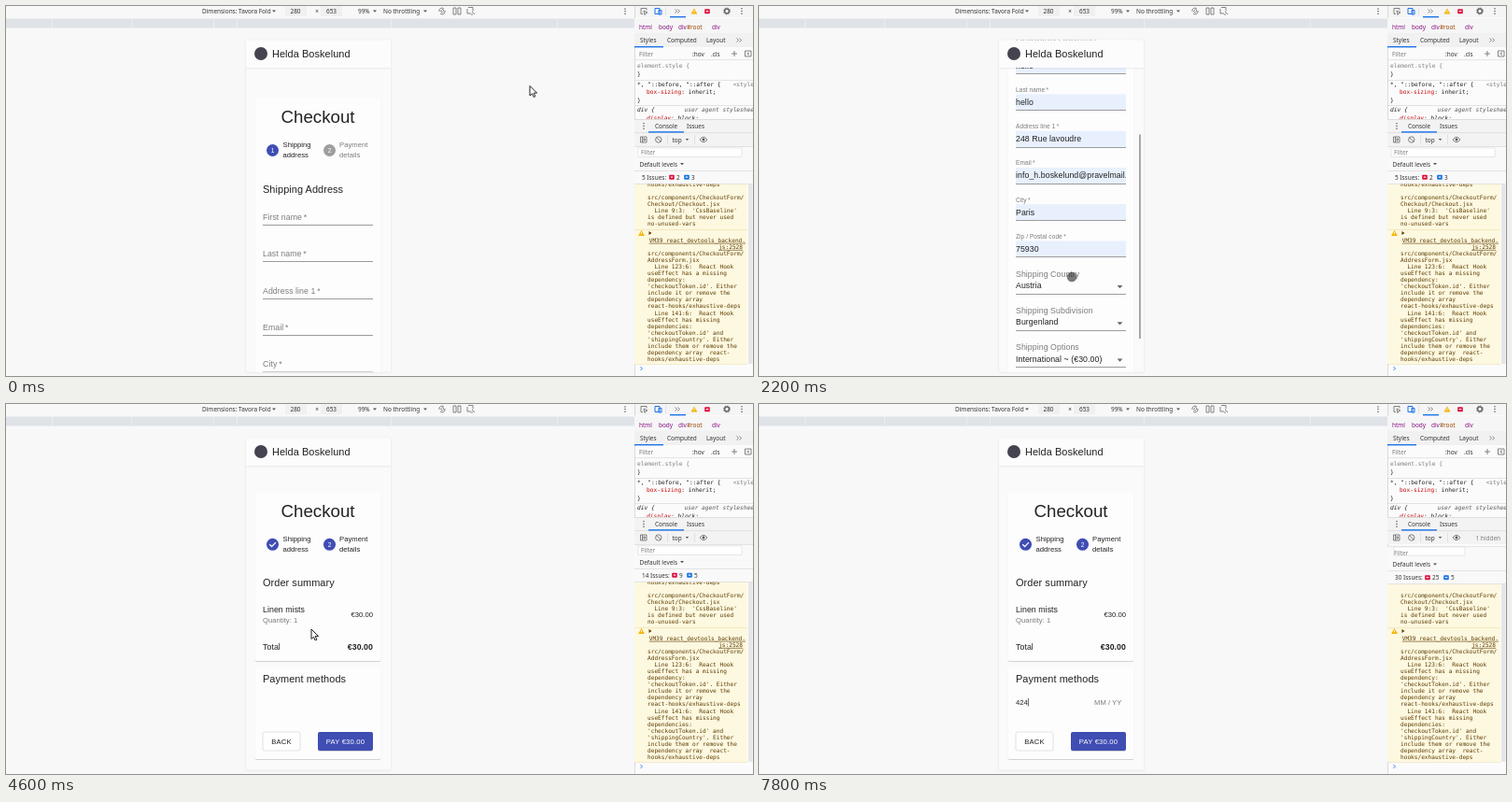
Animation of 800x396 px, one loop 8 s. Source, as an HTML page:

```html
<!DOCTYPE html>
<html lang="en">
<head>
<meta charset="utf-8">
<title>Checkout walkthrough</title>
<style>
html, body { margin: 0; width: 100%; height: 100%; overflow: hidden; background: #f8f8f9; }
svg { display: block; width: 100%; height: 100%; }
text { white-space: pre; fill: #222; }
.ui { font: 6.45px "Noto Sans", sans-serif; fill: #333; }
.pop { font: 8.5px "Noto Sans", sans-serif; }
.code { font: 6.2px "DejaVu Sans Mono", monospace; }
.log { font: 6.13px "DejaVu Sans Mono", monospace; fill: #5c3c00; }
.h4, .h6, .body, .small, .tiny, .btn { font-family: "Liberation Sans", Arial, sans-serif; }
.h4 { font-size: 18.7px; }
.h6 { font-size: 10.95px; letter-spacing: .06px; }
.body { font-size: 8.75px; letter-spacing: .07px; }
.small { font-size: 7.65px; letter-spacing: .03px; }
.tiny { font-size: 6.55px; letter-spacing: .06px; }
.btn { font-size: 7.65px; letter-spacing: .2px; }
.bold { font-weight: bold; }
.it { font-style: italic; }
.tag { fill: #881280; }
.grey { fill: #7c7c7c; }
.white { fill: #fff; }
.blue { fill: #3f4db3; }
.end { text-anchor: end; }
.mid { text-anchor: middle; }
.line { fill: none; stroke: #666; stroke-width: .8; }
.filled, .focused, .pay, .card, .late { display: none; }
.is-filled .filled, .is-focused .focused, .is-pay .pay, .is-card .card, .is-late .late { display: inline; }
.is-filled .empty, .is-focused .unfocused, .is-pay .ship, .is-late .early { display: none; }
</style>
</head>
<body>
<svg id="stage" viewBox="0 0 800 396" preserveAspectRatio="none"></svg>
<script>
const stage = document.getElementById('stage');
const esc = s => s.replace(/&/g, '&amp;').replace(/</g, '&lt;');
const text = (x, y, s, cls, extra = '') => `<text x="${x}" y="${y}" class="${cls}" ${extra}>${esc(s)}</text>`;
const rect = (x, y, w, h, fill, extra = '') => `<rect x="${x}" y="${y}" width="${w}" height="${h}" fill="${fill}" ${extra}/>`;
const disc = (x, y, r, fill) => `<circle cx="${x}" cy="${y}" r="${r}" fill="${fill}"/>`;
const path = (d, extra = 'class="line"') => `<path d="${d}" ${extra}/>`;
const group = (cls, inner, extra = '') => `<g class="${cls}" ${extra}>${inner}</g>`;
const down = (x, y, r = 2, fill = '#555') => path(`M${x - r} ${y - r / 2}h${2 * r}l${-r} ${r * 1.1}z`, `fill="${fill}"`);
const more = (x, y) => path(`M${x - 2.5} ${y - 2}l2 2-2 2m3-4l2 2-2 2`);
const dots = (x, y) => [-2.7, 0, 2.7].map(d => disc(x, y + d, .75, '#555')).join('');
const gear = (x, y) => `<circle cx="${x}" cy="${y}" r="2.4" class="line" style="stroke-width:1.5"/>` +
  `<circle cx="${x}" cy="${y}" r="3.6" class="line" stroke-dasharray="1.4 1.43"/>`;
const warning = (x, y) => path(`M${x} ${y - 3}l3.4 6h-6.8z`, 'fill="#f4b400"') + rect(x - .4, y - 1, .8, 2.4, '#fff');
const badge = (x, y, fill) => rect(x - 2.8, y - 2.8, 5.6, 5, fill, 'rx=".8"') + rect(x - 1.2, y - 1, 2.4, 1.2, '#fff');

const EMAIL = 'info_h.boskelund@pravelmail.com';
const BLUE = '#3f4db3', RULE = '#d4d4d6';
const LEFT = 275, RIGHT = 393;

function toolbar() {
  return rect(0, 0, 673, 12, '#f8f8f8') + rect(0, 13.5, 673, 10, '#dfe3e8') +
    [49, 134, 222, 247, 412, 590].map(x => rect(x, 14, .8, 9, '#eef0f3')).join('') +
    text(210, 8.2, 'Dimensions: Tavora Fold', 'ui') + down(287, 5.6) +
    rect(299, .5, 23, 10.5, '#f0f0f1') + text(310, 8.2, '280', 'ui mid') +
    text(333, 8.2, '×', 'ui mid') +
    rect(337, .5, 23, 10.5, '#f0f0f1') + text(348.5, 8.2, '653', 'ui mid') +
    text(377, 8.2, '99%', 'ui') + down(395, 5.6) +
    text(404, 8.2, 'No throttling', 'ui') + down(449, 5.6) +
    path('M464 6a3 3 0 0 1 5-3M470 5a3 3 0 0 1-5 3M465.5 5.5l2-2 1.7 1.7-2 2z') +
    path('M479 2h3v7h-3zM484 2h3v7h-3z') + path('M495 1.5h5v4M494 3v5h4M499 6l3 3M498 9l2 0') + dots(663, 5.6);
}

function stylesPane() {
  return rect(673, 0, 127, 396, '#fbfbfc') + rect(673, 0, 127, 12, '#f5f5f6') + rect(673, 0, .8, 396, RULE) +
    path('M682 8.5h-2v-6h6v2M683 5l4 2-2 .5-1 2z') +
    path('M695 2.5h5v6h-5zM699 4.5h3v4.5h-3z', 'fill="none" stroke="#1a73e8"') +
    more(719, 5.5) + rect(711, 11, 17, 1.4, '#1a73e8') + rect(706, 1, .6, 9, RULE) +
    warning(737, 5.5) + badge(751, 6, '#e0113c') + gear(772, 5.5) + dots(788, 5.5) +
    rect(673, 13, 127, 16, '#f6f6f7') + text(678, 24.5, 'html', 'ui tag') + text(699, 24.5, 'body', 'ui tag') +
    `<text x="720" y="24.5" class="ui tag">div<tspan fill="#994500">#root</tspan></text>` + text(756, 24.5, 'div', 'ui tag') +
    rect(673, 29, 127, 15, '#f1f1f2') + text(679, 39, 'Styles', 'ui') + text(708, 39, 'Computed', 'ui') +
    text(750, 39, 'Layout', 'ui') + more(785, 36.5) + rect(673, 43, 31, 1.4, '#1a73e8') +
    text(678, 54, 'Filter', 'ui grey') + text(735, 53.5, ':hov', 'ui') + text(755, 53.5, '.cls', 'ui') +
    path('M777 51h6M780 48v6') + path('M791.5 48h6.5v6h-6.5zM796 49.5l-2 1.5 2 1.5') +
    rect(673, 57.5, 127, .6, RULE) +
    text(676, 65.8, 'element.style {', 'code grey') + text(676, 74.8, '}', 'code') + rect(673, 79, 127, .6, RULE) +
    text(676, 85.8, '*, "::before, "::after {', 'code') + text(801, 85.8, '<style', 'code end grey') +
    `<text x="686" y="94.3" class="code"><tspan fill="#c80000">box-sizing</tspan>: inherit;</text>` +
    text(676, 102.8, '}', 'code') + rect(673, 106, 127, .6, RULE) +
    text(676, 113, 'div {', 'code it') + text(801, 113, 'user agent styleshee', 'code it end', 'fill-opacity=".75"') +
    `<text x="686" y="122" class="code it"><tspan fill="#c80000">display</tspan>: block;</text>`;
}

const LOG_HEAD = `src/components/CheckoutForm/
Checkout/Checkout.jsx
  Line 9:3:  'CssBaseline'
is defined but never used
no-unused-vars`;
const LOG_TAIL = `src/components/CheckoutForm/
AddressForm.jsx
  Line 123:6:  React Hook
useEffect has a missing
dependency:
'checkoutToken.id'. Either
include it or remove the
dependency array
react-hooks/exhaustive-deps
  Line 141:6:  React Hook
useEffect has missing
dependencies:
'checkoutToken.id' and
'shippingCountry'. Either
include them or remove the
dependency array  react-
hooks/exhaustive-deps`;

function consolePane() {
  const lines = (s, y) => s.split('\n').map((l, i) => text(687, y + i * 7.06, l, 'log')).join('');
  const box = `stroke="${RULE}" stroke-width=".5"`;
  const filters = rect(673, 150, 127, 40, '#f9f9fa') + rect(673, 150, 127, .6, RULE) +
    group('early', rect(677, 152, 111, 9.5, '#fff', box)) + group('late', rect(680, 150.5, 76, 9, '#fff', box)) +
    text(680, 159, 'Filter', 'ui grey') +
    text(678.5, 171.5, 'Default levels', 'ui') + down(724, 169) +
    rect(673, 176, 127, .6, RULE) + `<text id="issues" x="681" y="185.7" class="ui"></text>` +
    group('', badge(713, 183.5, '#e0113c') + `<text id="errors" x="718" y="185.7" class="ui"></text>` +
      `<g id="infos">${badge(729, 183.5, '#1a73e8')}<text id="infoCount" x="734" y="185.7" class="ui"></text></g>`, 'id="badges"') +
    rect(673, 190, 127, .6, RULE);
  return rect(673, 190, 121, 193, '#fdf8e0') + rect(673, 239.3, 121, .7, '#efe2b0') + rect(673, 383, 121, .6, '#efe2b0') +
    rect(795, 191, 4.5, 192, '#e6e6e8') +
    group('early', lines('hooks/exhaustive-deps', 193)) + lines(LOG_HEAD, 207.1) +
    warning(680.5, 243) + path('M688.5 241l3 2-3 2z', 'fill="#5c3c00"') +
    text(792, 252.8, 'VM39 react_devtools_backend.', 'log end', 'text-decoration="underline"') +
    text(789, 259.9, 'js:2528', 'log end', 'text-decoration="underline"') + lines(LOG_TAIL, 267) +
    path('M679.5 386l2 2-2 2', 'fill="none" stroke="#3b78e7" stroke-width=".9"') +
    rect(673, 121, 127, 29, '#f3f3f4') + rect(673, 121, 127, .7, RULE) + rect(673, 135.5, 127, .6, RULE) +
    dots(683, 128.5) + text(695, 131, 'Console', 'ui') + text(729, 131, 'Issues', 'ui') + rect(688, 134.2, 38, 1.4, '#1a73e8') +
    path('M679.5 140h6.5v6h-6.5zM681.5 140v6M683 141.5l2 1.5-2 1.5z') +
    path('M702 143a3.2 3.2 0 1 1-6.4 0a3.2 3.2 0 1 1 6.4 0M696.6 140.7l4.5 4.5') +
    rect(708, 138, .6, 10, RULE) + text(713.5, 145.5, 'top', 'ui') + down(729.5, 143, 1.8) + rect(737, 138, .6, 10, RULE) +
    path('M743 143q4-5.5 8 0q-4 5.5-8 0z') + disc(747, 143, 1.4, '#555') +
    group('late', text(767.5, 145.5, '1 hidden', 'ui grey')) +
    `<g id="filters">${filters}</g>`;
}

const button = (x, y, w, label, primary) =>
  rect(x, y, w, 20, primary ? BLUE : '#fefefe', primary ? 'rx="2" filter="url(#edge)"' : 'rx="2" stroke="#d2d2d4" stroke-width=".6"') +
  text(x + w / 2, y + 12.8, label, 'btn mid' + (primary ? ' white' : ''));

const paper = (y, h) => rect(266.5, y, 135, h, '#fdfdfe', 'rx="2" filter="url(#edge)"');

// Heading and stepper, slightly higher on the payment page.
function heading(paying) {
  const y = paying ? 150.3 : 154.5;
  return text(334, y - 29.7, 'Checkout', 'h4 mid') + disc(285.5, y, 6.5, BLUE) + disc(346.5, y, 6.5, paying ? BLUE : '#9e9e9e') +
    (paying ? path(`M282.3 ${y}l2.3 2.3 4.3-4.5`, 'fill="none" stroke="#fff" stroke-width="1.3"')
      : text(285.5, y + 2.3, '1', 'tiny mid white')) +
    text(346.5, y + 2.3, '2', 'tiny mid white') +
    text(296.5, y - 3.2, 'Shipping', 'small') + text(296.5, y + 7.8, 'address', 'small') +
    ['Payment', 'details'].map((s, i) => text(357, y - 3.2 + 11 * i, s, 'small' + (paying ? '' : ' grey'))).join('');
}

const FIELDS = [['First name', 'hello'], ['Last name', 'hello'], ['Address line 1', '248 Rue lavoudre'],
  ['Email', EMAIL], ['City', 'Paris'], ['Zip / Postal code', '75930']];
const SELECTS = [['Shipping Country', 'Austria'], ['Shipping Subdivision', 'Burgenland'], ['Shipping Options', 'International ~ (€30.00)']];
const fieldLine = i => 234.5 + 39.25 * i;
const underline = y => rect(LEFT, Math.floor(y), 118, 1, '#9c9c9e');

function shippingPage() {
  const fields = FIELDS.map(([label, value], i) => {
    const y = fieldLine(i), star = label + '\u2009*';
    return group('empty' + (i ? '' : ' unfocused'), text(LEFT, y - 5.4, star, 'body grey')) +
      group('filled', rect(LEFT, y - 17.3, 118, 17, '#e8f0fe') + text(LEFT, y - 20, star, 'tiny grey') +
        text(LEFT, y - 6, value, 'body', 'clip-path="url(#inputClip)"')) + underline(y);
  }).join('');
  const selects = SELECTS.map(([label, value], i) => {
    const y = fieldLine(i + 6);
    return text(LEFT, y - 18.5, label, 'body grey') + text(LEFT, y - 6, value, 'body') +
      down(386.5, y - 7.5, 2.9, '#666') + underline(y);
  }).join('');
  const y = fieldLine(0);
  return paper(98.5, 490.5) + heading(false) + text(LEFT, 199.7, 'Shipping Address', 'h6') + fields + selects +
    group('focused', text(LEFT, y - 19.2, 'First name\u2009*', 'tiny blue') + rect(LEFT, y - .7, 118, 1.3, BLUE) +
      rect(LEFT, y - 14.5, .6, 10, '#aaa')) +
    button(LEFT, 560.5, 76, 'BACK TO CART') + button(354, 560.5, 39, 'NEXT', true);
}

function paymentPage() {
  return paper(94.5, 180.5) + paper(282, 98) + heading(true) +
    text(LEFT, 195.3, 'Order summary', 'h6') + text(LEFT, 222.7, 'Linen mists', 'body') +
    text(LEFT, 234.3, 'Quantity: 1', 'small grey') + text(RIGHT, 228, '€30.00', 'small end') +
    text(LEFT, 263, 'Total', 'body') + text(RIGHT, 263, '€30.00', 'body bold end') +
    text(LEFT, 298.4, 'Payment methods', 'h6') +
    group('card', `<text id="cardNumber" x="${LEFT}" y="321.5" class="small"></text>` + text(359, 321.5, 'MM / YY', 'small grey') +
      rect(LEFT, 315, .7, 8.5, '#222', 'id="caret"')) +
    button(LEFT, 351, 40, 'BACK') + button(334, 351, 59, 'PAY €30.00', true);
}

function phone() {
  const popup = rect(257, 120.5, 138, 63.5, '#fefefe', 'filter="url(#lift)"') +
    text(264, 136.7, 'hello', 'pop bold') + text(264, 150, EMAIL, 'pop', 'clip-path="url(#popClip)"') +
    rect(257, 161, 138, .6, '#f0f0f0') + text(264, 176, 'Manage addresses…', 'pop');
  return rect(257, 36.5, 155, 355, '#fafafb', 'filter="url(#soft)"') +
    `<g clip-path="url(#screen)"><g id="page" class="ship">${shippingPage()}</g>${group('pay', paymentPage())}` +
    rect(257, 36.5, 155, 29.5, '#fcfcfd', 'filter="url(#soft)"') + disc(273, 51, 7, '#45434f') +
    text(285, 54.8, 'Helda Boskelund', 'h6') + rect(407.2, 36, 1.5, 219, '#8d8d8d', 'id="thumb" rx=".7"') + '</g>' +
    group('focused', popup);
}

const clip = (id, x, y, w, h) => `<clipPath id="${id}">${rect(x, y, w, h, '#000')}</clipPath>`;
const shadow = (id, dy, blur, opacity) => `<filter id="${id}" x="-10%" y="-10%" width="120%" height="125%">` +
  `<feDropShadow dx="0" dy="${dy}" stdDeviation="${blur}" flood-opacity="${opacity}"/></filter>`;
stage.innerHTML = '<defs>' + shadow('lift', .7, 1, .22) + shadow('edge', .8, .4, .2) + shadow('soft', .5, 1, .1) +
  clip('screen', 257, 36.5, 155, 355) + clip('inputClip', LEFT, 0, 118, 700) + clip('popClip', 264, 0, 124, 396) + '</defs>' +
  toolbar() + phone() + stylesPane() + consolePane() +
  path('M0 0v10.5l2.5-2.2 1.7 3.7 1.7-.8-1.7-3.6h3.4z', 'id="arrow" fill="#fff" stroke="#222" stroke-width="1"') +
  '<circle id="touch" r="5.2" fill="#333" fill-opacity=".65"/>';

// Keys are [time, value, ...]; values ease between neighbours.
function sample(keys, t) {
  const i = keys.findIndex(k => k[0] > t);
  if (i < 0) return keys[keys.length - 1].slice(1);
  const a = keys[i - 1], b = keys[i], p = (t - a[0]) / (b[0] - a[0]), e = p * p * (3 - 2 * p);
  return a.slice(1).map((v, n) => v + (b[n + 1] - v) * e);
}
const latest = (steps, t) => steps.filter(s => s[0] <= t).pop().slice(1);

const SCROLL = [[0, 0], [600, 0], [1200, 116], [2000, 116], [2400, 208], [2800, 208], [3200, 209]];
const POINTER = [[0, 561, 85.5], [200, 561, 85.5], [600, 340, 260], [1000, 335, 200], [1400, 317, 112], [1600, 317, 124],
  [1800, 300, 137], [2000, 300, 140], [2200, 335, 290], [2600, 339.5, 278.5], [3000, 345, 300], [3600, 371, 363],
  [4000, 371, 363], [4600, 327, 241], [5200, 327, 241], [5800, 295, 318]];
const ISSUES = [[0, 5, 2, 3], [4200, 14, 9, 5], [5400, 29, 24, 5], [7000, 30, 25, 5]];
const TYPED = [[0, ''], [7200, '4'], [7400, '42'], [7600, '424']];
const STATES = { focused: [1400, 2000], filled: [2000, 8000], pay: [4200, 8000], card: [5600, 8000], late: [5400, 8000] };
const within = (t, [a, b]) => t >= a && t < b;
const el = id => document.getElementById(id);
const move = (id, x, y) => el(id).setAttribute('transform', `translate(${x} ${y})`);
const show = (id, on) => el(id).style.display = on ? 'inline' : 'none';

function render(t) {
  for (const name in STATES) stage.classList.toggle('is-' + name, within(t, STATES[name]));

  const [scroll] = sample(SCROLL, t);
  move('page', 0, -scroll);
  move('thumb', 0, scroll * 130 / 208);
  show('thumb', within(t, [800, 1400]) || within(t, [2200, 2800]));

  const [x, y] = sample(POINTER, t);
  const touching = within(t, [600, 1400]) || within(t, [2000, 4400]);
  move('arrow', x, y);
  move('touch', x, y);
  show('touch', touching);
  show('arrow', !touching && t < 6400);

  const [issues, errors, infos] = latest(ISSUES, t);
  el('issues').textContent = issues + ' Issues:';
  el('errors').textContent = errors;
  el('infoCount').textContent = infos;
  move('badges', issues > 9 ? 3 : 0, 0);
  move('infos', errors > 9 ? 4 : 0, 0);
  move('filters', 0, within(t, STATES.late) ? 2.5 : 0);

  const [typed] = latest(TYPED, t);
  el('cardNumber').textContent = typed || 'Card number';
  el('cardNumber').setAttribute('class', typed ? 'small' : 'small grey');
  move('caret', typed.length * 4.3, 0);
  show('caret', t >= 6200);
}

let shown = -1;
function tick(now) {
  const t = Math.floor(now % 8000 / 200) * 200;
  if (t !== shown) render(shown = t);
  requestAnimationFrame(tick);
}
render(0);
requestAnimationFrame(tick);
</script>
</body>
</html>
```
